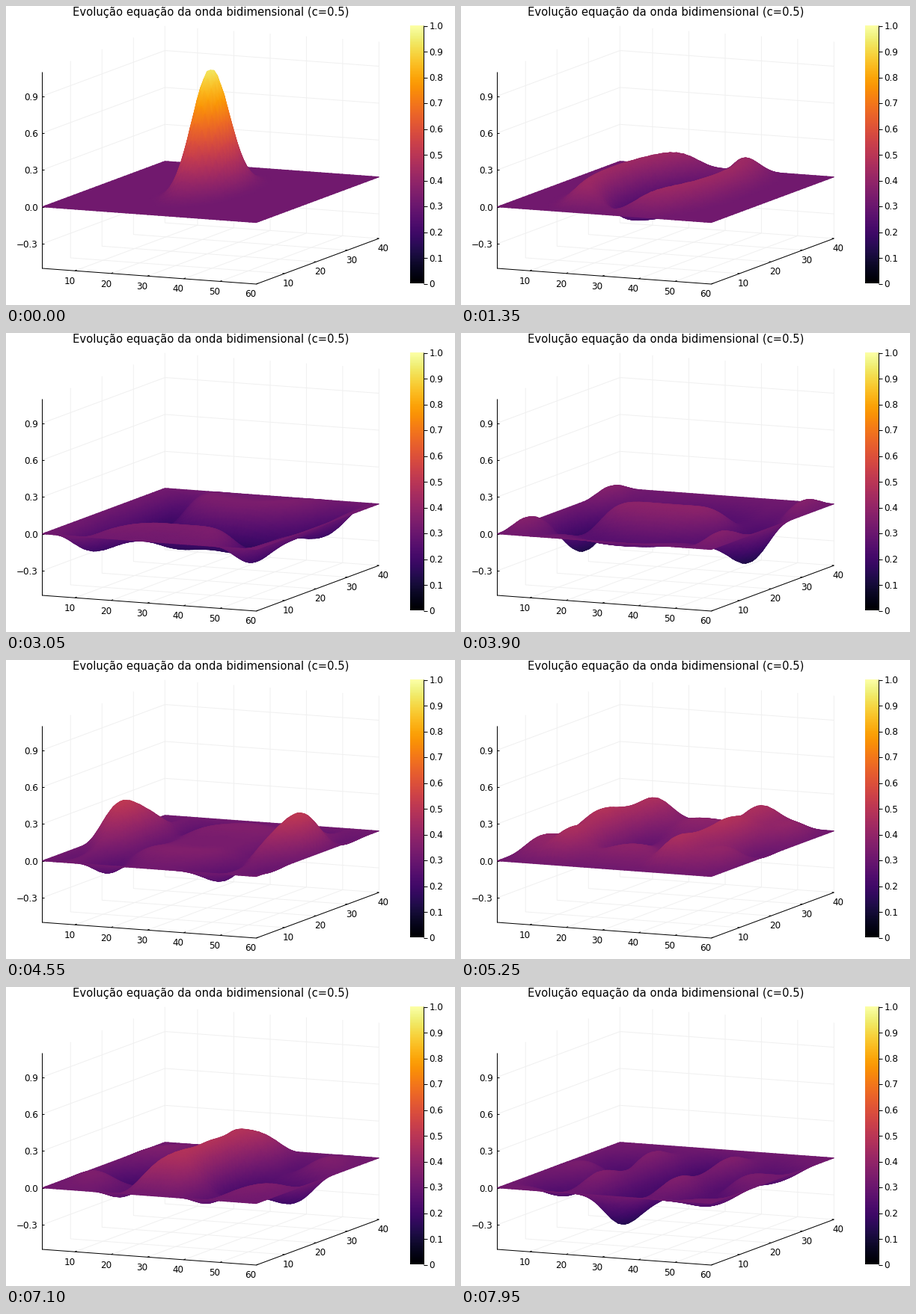
A matplotlib script for the animation above (8 s loop, 600 by 400 pixels).

```python
import numpy as np
import matplotlib.pyplot as plt
from matplotlib.animation import FuncAnimation

W, H, DPI = 600, 400, 100
PX = 72 / DPI                      # one pixel in points
NX, NY, STEPS = 60, 40, 160
Z_LOW, Z_HIGH = -0.5, 1.1
SX, SY = 0.467, 0.621              # cells travelled per step along x and y
DX, DY = 1 / 30, 1 / 40            # cell size for the starting bump


def project(x, y, z):
    """Oblique view of the box, in stage pixels."""
    a, b = (x - 1) / (NX - 1), (y - 1) / (NY - 1)
    return 48.4 + 286 * a + 164 * b, 268.7 + 21 * a - 61 * b - 164.6 * z


def solve():
    """Wave equation with fixed edges, starting from a resting bump."""
    x, y = np.meshgrid(np.arange(1, NX + 1), np.arange(1, NY + 1))
    u = np.exp(-40 * (((x - 30.5) * DX) ** 2 + ((y - 20.5) * DY) ** 2))
    u[[0, -1]] = 0
    u[:, [0, -1]] = 0

    def accel(f):
        out = np.zeros_like(f)
        core = f[1:-1, 1:-1]
        out[1:-1, 1:-1] = (SX**2 * (f[1:-1, 2:] - 2 * core + f[1:-1, :-2])
                           + SY**2 * (f[2:, 1:-1] - 2 * core + f[:-2, 1:-1]))
        return out

    states = [u, u + accel(u) / 2]
    while len(states) < STEPS:
        states.append(2 * states[-1] - states[-2] + accel(states[-1]))
    return states


fig = plt.figure(figsize=(W / DPI, H / DPI), dpi=DPI, facecolor="white")
ax = fig.add_axes([0, 0, 1, 1])


def path(points, color="black", width=1.0, order=1):
    xs, ys = zip(*points)
    ax.plot(xs, ys, color=color, lw=width * PX, zorder=order,
            solid_capstyle="butt")


def wall(*corners):
    path([project(*c) for c in corners], color="#f0f0f0", order=0)


def label(x, y, text, size=12, **align):
    style = dict(ha="center", va="center_baseline") | align
    ax.text(x, y, text, fontsize=size * PX, family="DejaVu Sans", **style)


def tick(x, y, dx, dy):
    path([(x, y), (x + dx, y + dy)])


def draw_box():
    for i, x in enumerate(range(10, 61, 10)):
        wall((x, 1, Z_LOW), (x, NY, Z_LOW), (x, NY, Z_HIGH))
        px, py = project(x, 1, Z_LOW)
        tick(px, py, 2.6, -1)
        label(85.5 + 48.3 * i, 367.3 + 3.35 * i, str(x))
    for i, y in enumerate(range(10, 41, 10)):
        wall((NX, y, Z_LOW), (1, y, Z_LOW), (1, y, Z_HIGH))
        px, py = project(NX, y, Z_LOW)
        tick(px, py, -2.8, -0.2)
        label(377 + 42.3 * i, 370 - 15.6 * i, str(y))
    for z in (-0.3, 0.0, 0.3, 0.6, 0.9):
        wall((1, 1, z), (1, NY, z), (NX, NY, z))
        px, py = project(1, 1, z)
        tick(px, py, 2.6, 0)
        label(43, py, f"{z:.1f}".replace("-", "\u2212"), ha="right")
    path([project(1, 1, Z_HIGH), project(1, 1, Z_LOW)])
    path([project(1, 1, Z_LOW), project(NX, 1, Z_LOW), project(NX, NY, Z_LOW)])


def draw_colorbar():
    left, right, top, bottom = 540, 558, 26, 371
    ax.imshow(np.linspace(1, 0, 256)[:, None], cmap="inferno", aspect="auto",
              extent=(left, right, bottom, top), interpolation="bilinear")
    path([(right, top), (right, bottom)], order=3)
    for k in range(11):
        y = bottom + (top - bottom) * k / 10
        tick(right, y + 0.6, 5, 0)
        label(565.7, y, f"{k / 10:.1f}" if k else "0", ha="left")


draw_box()
draw_colorbar()
label(273.3, 13, "Evolução equação da onda bidimensional (c=0.5)", 14.75,
      va="baseline")
ax.set_xlim(0, W)
ax.set_ylim(H, 0)
ax.axis("off")
ax.autoscale(False)

# Rows run from the back to the front so nearer cells cover farther ones.
gx, gy = np.meshgrid(np.arange(1, NX + 1), np.arange(NY, 0, -1))
states = solve()
shown = []


def draw(n):
    while shown:
        shown.pop().remove()
    z = states[n][::-1]
    px, py = project(gx, gy, z)
    shown.append(ax.pcolormesh(px, py, z, shading="gouraud", cmap="inferno",
                               vmin=Z_LOW, vmax=Z_HIGH, zorder=2))
    return shown


anim = FuncAnimation(fig, draw, frames=STEPS, interval=50, repeat=True)
plt.show()
```
